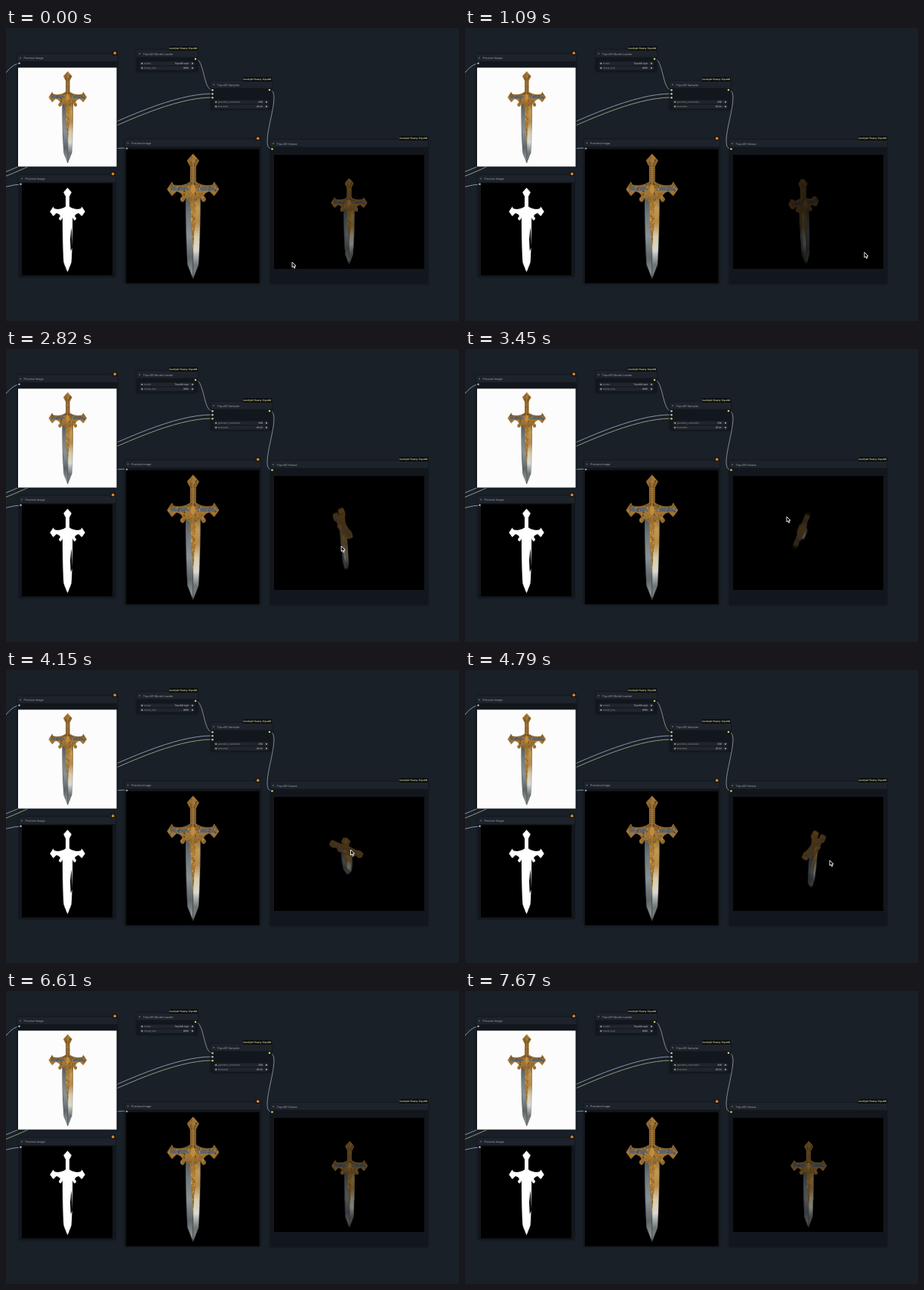
Animation of 600 by 388 pixels, one loop 7700 ms. Source, as an HTML page with a canvas:

```html
<!DOCTYPE html>
<html>
<head>
<meta charset="utf-8">
<style>
  html, body { margin: 0; width: 100%; height: 100%; overflow: hidden; background: #192028; }
  canvas { display: block; width: 600px; height: 388px; }
</style>
</head>
<body>
<canvas id="stage"></canvas>
<script>
const LOOP = 7700;
const stage = document.getElementById('stage');
const dpr = window.devicePixelRatio || 1;
stage.width = 600 * dpr;
stage.height = 388 * dpr;
const g = stage.getContext('2d');
g.scale(dpr, dpr);
g.imageSmoothingQuality = 'high';
g.textRendering = 'geometricPrecision';

// ---- Sword sprites: 80 x 170 units around the blade axis ----
const W = 80, H = 170, RES = 4;

function mirrored(half) {
  const path = new Path2D(half);
  path.addPath(new Path2D(half), new DOMMatrix([-1, 0, 0, 1, 0, 0]));
  return path;
}

const hilt = mirrored('M0-83L8-74L3.8-66V-46Q14-39 26-42L28-46L34.5-36L28-27L22-33Q16-32 14-27Q20-22 14-19Q11-20 10-25L0-17Z');
const blade = mirrored('M0-30L10-28C10 0 9.5 30 7.5 64L0 83Z');
const filigree = mirrored('M0-30H5L2.5 0Q4 10 1.5 20L0 52Z');

function random(seed) {
  return () => (seed = (seed * 16807) % 2147483647) / 2147483647;
}

function sprite(paint) {
  const canvas = document.createElement('canvas');
  canvas.width = W * RES;
  canvas.height = H * RES;
  const c = canvas.getContext('2d');
  c.scale(RES, RES);
  c.translate(W / 2, H / 2);
  paint(c);
  return canvas;
}

const swordSprite = sprite(c => {
  const rnd = random(77);
  const vertical = (top, bottom, ...colors) => {
    const fill = c.createLinearGradient(0, top, 0, bottom);
    colors.forEach((color, i) => fill.addColorStop(i / (colors.length - 1), color));
    return fill;
  };
  const flecks = (count, top, bottom, width, colors) => {
    for (let i = 0; i < count; i++) {
      c.fillStyle = colors[i % colors.length];
      c.fillRect((rnd() - 0.5) * width, top + rnd() * (bottom - top), 0.6 + rnd(), 0.8 + rnd() * 1.4);
    }
  };
  const inside = (path, paint) => {
    c.save();
    c.clip(path);
    paint();
    c.restore();
  };

  inside(blade, () => {
    c.fillStyle = vertical(-30, 83, '#4c5357', '#71797c', '#8b9294', '#5f676a', '#a2a6a5');
    c.fillRect(-10, -30, 10, 114);
    c.fillStyle = vertical(-30, 83, '#80602f', '#c09a55', '#b5894a', '#d8cba8', '#d9d9d2', '#6f7678', '#7d8385');
    c.fillRect(0, -30, 10, 114);
    c.strokeStyle = '#45494b';
    c.stroke(blade);
  });
  inside(filigree, () => {
    c.fillStyle = vertical(-30, 52, '#8a5e22', '#b98538', '#8f6730', '#a3854f');
    c.fillRect(-10, -30, 20, 90);
    flecks(90, -30, 50, 10, ['#4a3212aa', '#e0b762aa']);
  });
  inside(hilt, () => {
    c.fillStyle = vertical(-83, -17, '#b98338', '#74501f', '#5d4423', '#a87631', '#84602a');
    c.fillRect(-40, -85, 80, 70);
    c.fillStyle = '#5a636a';
    for (const side of [-30, 6]) c.fillRect(side, -39, 24, 5);
    c.strokeStyle = '#a47737';
    for (let y = -65; y < -46; y += 2.6) c.strokeRect(-5, y, 10, 0.3);
    const tones = ['#38260fbb', '#d9ab55aa', '#8a908f66'];
    flecks(45, -82, -68, 16, tones);
    flecks(200, -46, -18, 70, tones);
    c.lineWidth = 1.6;
    c.stroke(hilt);
  });
  c.fillStyle = '#c08d40';
  c.beginPath();
  c.ellipse(0, -36, 3.2, 6, 0, 0, 7);
  c.fill();
});

const maskSprite = sprite(c => {
  c.fillStyle = '#fff';
  c.fill(blade);
  c.fill(hilt);
  c.fillStyle = '#000';
  c.fill(new Path2D('M8-5L5 18L6.3 42L9 34Z'));
});

function putSword(image, x, y, scale) {
  g.drawImage(image, x - W / 2 * scale, y - H / 2 * scale, W * scale, H * scale);
}

// ---- Node graph ----
const BLUE = '#8794a8', OLIVE = '#929b7c', GREY = '#858b90', LIME = '#c3d264';

function box(x, y, w, h, fill, radius = 0) {
  g.fillStyle = fill;
  g.beginPath();
  g.roundRect(x, y, w, h, radius);
  g.fill();
}

function dot(x, y, fill, r = 1.3) {
  g.fillStyle = fill;
  g.beginPath();
  g.arc(x, y, r, 0, 7);
  g.fill();
}

function label(str, x, y, size, fill, align = 'left', weight = 400) {
  g.font = `${weight} ${size}px Inter, Arial, sans-serif`;
  g.textAlign = align;
  g.fillStyle = fill;
  g.fillText(str, x, y);
}

// Links leave and arrive horizontally, bending by a quarter of their length.
function link(color, x1, y1, x2, y2) {
  const bend = Math.hypot(x2 - x1, y2 - y1) / 4;
  g.strokeStyle = color;
  g.lineWidth = 1;
  g.beginPath();
  g.moveTo(x1, y1);
  g.bezierCurveTo(x1 + bend, y1, x2 - bend, y2, x2, y2);
  g.stroke();
}

function node(title, x, y, w, h, inputs, output) {
  g.shadowColor = '#0007';
  g.shadowBlur = 3 * dpr;
  box(x, y, w, h, '#12171d', 1.5);
  g.shadowBlur = 0;
  box(x, y, w, 9.5, '#1e232b', [1.5, 1.5, 0, 0]);
  dot(x + 4, y + 5, '#5b6067', 1.1);
  label(title, x + 8.5, y + 6.6, 3.8, '#9a9ea4');
  inputs.forEach((color, i) => dot(x + 2.5, y + 12.3 + 5 * i, color));
  if (output) dot(x + w - 3, y + 12, output);
}

function preview(x, y, w, h, inset, fill, image, scale) {
  node('Preview Image', x, y, w, h, ['#a9b4c4']);
  const right = x + w, top = y + (h - w) + inset, side = w - inset * 2;
  box(x + inset, top, side, y + h - top - inset / 2, fill);
  putSword(image, x + w / 2 + 0.5, (top + y + h) / 2, scale);
  box(right - 6, y - 4, 5.4, 5.4, '#0b0e10', 1);
  dot(right - 3.3, y - 1.3, '#d9822b', 1.9);
}

function modelNode(title, x, y, w, h, inputs, output, widgets = {}) {
  const right = x + w;
  node(title, x, y, w, h, inputs, output);
  box(right - 38, y - 5, 38, 6, '#0b0e10', 1);
  label('ComfyUI-Flowty-TripoSR', right - 1, y - 0.8, 3.05, '#e6e6a2', 'right', 600);
  let top = y + 10.4 + 5 * Math.max(inputs.length, 1);
  for (const [name, value] of Object.entries(widgets)) {
    box(x + 4, top, w - 8, 5.2, '#20242b', 2.6);
    label('◀', x + 5.5, top + 3.7, 2.8, '#c4c7ca');
    label('▶', right - 5.5, top + 3.7, 2.8, '#c4c7ca', 'right');
    label(name, x + 9.5, top + 3.7, 3.1, '#8d9197');
    label(value, right - 12, top + 3.7, 3.1, '#d5d7d9', 'right');
    top += 6.1;
  }
}

function drawGraph() {
  g.fillStyle = '#192028';
  g.fillRect(0, 0, 600, 388);

  link(BLUE, -40, 100, 18, 47);
  link(BLUE, -60, 225, 20, 207);
  link(BLUE, 60, 166, 159, 159);
  link(BLUE, -100, 216, 273, 87);
  link(OLIVE, -100, 222, 273, 92);
  link(GREY, 251, 41, 273, 82);
  link(GREY, 349, 82, 352, 160);

  preview(15, 34.5, 132.5, 149.5, 1, '#fcfcfc', swordSprite, 0.735);
  preview(17, 194.5, 128, 135, 4, '#000', maskSprite, 0.675);
  preview(157.5, 147.5, 179.5, 191, 1.5, '#000', swordSprite, 1);
  modelNode('TripoSR Model Loader', 173, 29, 81, 29, [], LIME, { model: 'TripoSR.ckpt', chunk_size: '8192' });
  modelNode('TripoSR Sampler', 271, 70, 81, 38, [LIME, '#b5c2d3', LIME], LIME,
    { geometry_resolution: '256', threshold: '25.00' });
  modelNode('TripoSR Viewer', 350, 148, 209, 191, [LIME]);
}

// ---- Orbiting model and pointer ----
// time, yaw and pitch in degrees, pointer x and y
const DRAGS = [
  [300, 0, 0, 379, 310],
  [1090, -141, 10, 529, 297],
  [2150, -8, 0, 464, 304],
  [3450, -112, 86, 426, 222],
  [4790, 54, 50, 483, 252],
  [5730, 80, 22, 475, 248],
  [6600, 4, 0, 480, 10]
];

function dragAt(t) {
  const last = DRAGS.length - 1;
  const i = Math.max(1, DRAGS.findIndex(([time]) => time > t) + 1 || last + 1) - 1;
  const a = DRAGS[Math.max(i - 1, 0)], b = DRAGS[i];
  const p = Math.min(Math.max((t - a[0]) / (b[0] - a[0] || 1), 0), 1);
  const ease = p * p * (3 - 2 * p);
  return a.slice(1).map((v, k) => v + (b[k + 1] - v) * ease);
}

function drawModel(yaw, pitch) {
  const a = yaw * Math.PI / 180, b = pitch * Math.PI / 180;
  const sinA = Math.sin(a), cosA = Math.cos(a), sinB = Math.sin(b), cosB = Math.cos(b);
  const scale = 0.68, hiltHeight = 68;
  // The sword hangs a little in front of and below the pivot.
  const offset = 8 * sinA;
  const x = 454.5 + offset, y = 241 + 15 * cosB;
  const lean = -offset / 130;

  g.save();
  g.beginPath();
  g.rect(355, 168, 199, 151);
  g.clip();
  box(355, 168, 199, 151, '#000');
  // Stacked slices give the flat sword its thickness.
  for (let depth = -3; depth <= 3; depth += 0.5) {
    const w = depth * (cosA < 0 ? -1 : 1);
    const h = Math.abs(depth) <= 2 ? H : hiltHeight;
    g.save();
    g.translate(x + w * sinA, y + w * cosA * sinB);
    g.transform(scale * cosA, -scale * sinA * sinB, scale * lean, scale * cosB, 0, 0);
    g.drawImage(swordSprite, 0, 0, W * RES, h * RES, -W / 2, -H / 2, W, h);
    g.restore();
  }
  const darkness = 0.42 + 0.16 * (1 - cosA * cosB);
  box(355, 168, 199, 151, `rgba(0,0,0,${darkness})`);
  g.restore();
}

const arrow = new Path2D('M0 0V7L1.6 5.6L2.8 8.2L4 7.6L2.9 5.1H5Z');

function drawPointer(x, y) {
  g.save();
  g.translate(x, y);
  g.fillStyle = '#000';
  g.strokeStyle = '#fff';
  g.lineWidth = 0.9;
  g.fill(arrow);
  g.stroke(arrow);
  g.restore();
}

function frame(now) {
  const t = now % LOOP;
  const [yaw, pitch, x, y] = dragAt(t);
  drawGraph();
  drawModel(yaw, pitch);
  if (t < 6600) drawPointer(x, y);
  requestAnimationFrame(frame);
}
requestAnimationFrame(frame);
</script>
</body>
</html>
```
